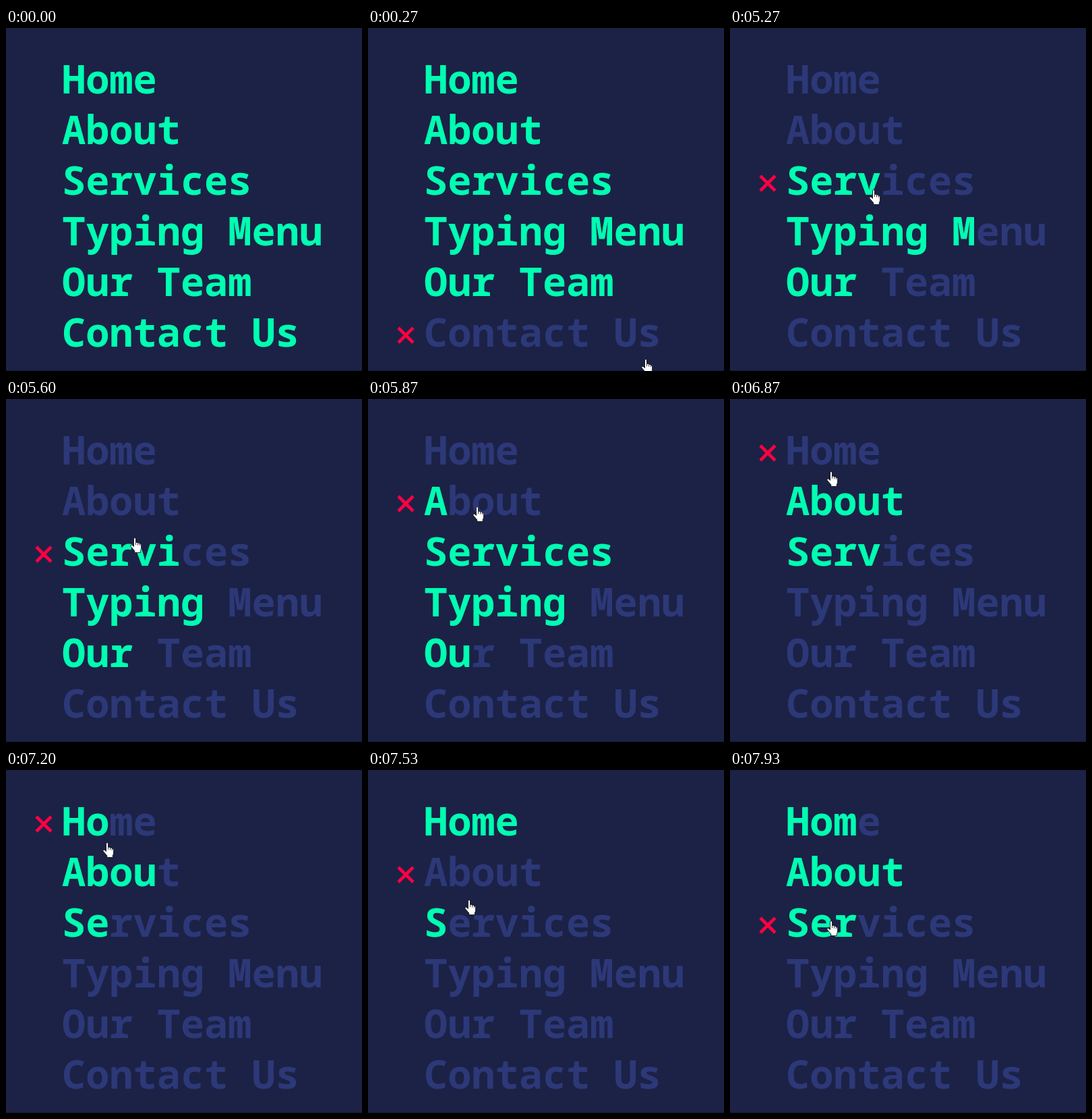
Write an HTML page that moves like this. It is 528 px wide and 508 px high and loops after 8000 ms.

```html
<!DOCTYPE html>
<html lang="en">
<head>
<meta charset="utf-8">
<title>Typing menu</title>
<style>
  html, body { margin: 0; width: 100%; height: 100%; overflow: hidden; background: #1b2246; }
  svg { display: block; width: 528px; height: 508px; }
  text { font: 700 58.65px "Noto Sans Mono", "DejaVu Sans Mono", monospace; white-space: pre; }
  .dim { fill: #2d3878; }
  .lit { fill: #00ffb0; }
  #cross { stroke: #ff0043; stroke-width: 4.6; }
  #hand path { fill: #fff; stroke: #000; stroke-width: .8; }
</style>
</head>
<body>
<svg viewBox="0 0 528 508">
  <rect y="507" width="528" height="1" fill="#141936"/>
  <g id="menu"></g>
  <path id="cross" d="M-11 -11L11 11M11 -11L-11 11"/>
  <g id="hand">
    <path d="M5.5 2Q5.5 .5 7 .5T8.5 2V7.5Q11 6.5 11.5 8.3Q14 7.5 14.3 9.3Q16.6 9 16.6 11.5V15.5Q16.6 18 15.3 19.5V22.5H6.8V20L1 13.2Q.2 11.3 2 11Q3.5 11 5.5 13.5Z"/>
    <path d="M8.5 8V11M11.5 8.6V11.5M14.3 9.6V12"/>
  </g>
</svg>
<script>
  const LOOP = 8000, TICK = 1000 / 15, TYPE = 1000, ERASE = 2000;
  const LEFT = 83, BASE = 97.3, PITCH = 75;
  const labels = ["Home", "About", "Services", "Typing Menu", "Our Team", "Contact Us"];

  // The scene rests after REST, then skips ahead to RESUME at CUT
  const REST = 270, CUT = 5260, RESUME = 5415;

  // The pointer enters a row: [row, time]
  const visits = [[5, 235], [4, 3400], [3, 4330], [2, 4866], [1, 5660], [0, 6665], [1, 7395], [2, 7550]];

  // Pointer stops: [time, x, y]
  const arrive = [[130, 512, 484], [REST, 402, 490]];
  const roam = [[5400, 206, 239], [5866, 155, 159], [6866, 143, 107],
                [7200, 143, 107], [7533, 143, 192], [7933, 143, 223]];

  const menu = document.getElementById("menu");
  const cross = document.getElementById("cross");
  const hand = document.getElementById("hand");

  function addText(cls, row) {
    const el = document.createElementNS("http://www.w3.org/2000/svg", "text");
    el.setAttribute("class", cls);
    el.setAttribute("x", LEFT);
    el.setAttribute("y", BASE + PITCH * row);
    el.textContent = labels[row];
    return menu.appendChild(el);
  }
  labels.forEach((_, row) => addText("dim", row));
  const lit = labels.map((_, row) => addText("lit", row));

  function along(stops, t) {
    const next = stops.findIndex(([time]) => time > t);
    if (next < 1) return stops[next < 0 ? stops.length - 1 : 0].slice(1);
    const [t0, x0, y0] = stops[next - 1], [t1, x1, y1] = stops[next];
    const k = (t - t0) / (t1 - t0);
    return [x0 + (x1 - x0) * k, y0 + (y1 - y0) * k];
  }

  // Entering a row types its label from nothing; leaving erases it from full length
  function lettersShown(row, t, past, idle) {
    const n = labels[row].length;
    const last = past.findLastIndex(([visited]) => visited === row);
    if (last < 0) return idle * n;
    if (last === past.length - 1) return Math.floor((t - past[last][1]) / TYPE * n);
    return Math.max(0, n - Math.floor((t - past[last + 1][1]) / ERASE * n));
  }

  function draw(time) {
    const t = Math.floor((time + 4) / TICK) * TICK;
    const opening = t < CUT;
    const now = opening ? Math.min(t, REST) : Math.max(t, RESUME);
    const past = visits.filter(([, start]) => start <= now);

    lit.forEach((el, row) => {
      el.textContent = labels[row].slice(0, lettersShown(row, now, past, opening ? 1 : 0));
    });

    const hovered = past.length ? past[past.length - 1][0] : -1;
    cross.style.display = hovered < 0 ? "none" : "";
    cross.setAttribute("transform", `translate(56 ${80 + PITCH * hovered})`);

    const spot = along(opening ? arrive : roam, t).map(Math.round);
    hand.style.display = t < arrive[0][0] ? "none" : "";
    hand.setAttribute("transform", `translate(${spot.join(" ")})`);
  }

  const begin = performance.now();
  function frame() {
    draw((performance.now() - begin) % LOOP);
    requestAnimationFrame(frame);
  }
  frame();
</script>
</body>
</html>
```
